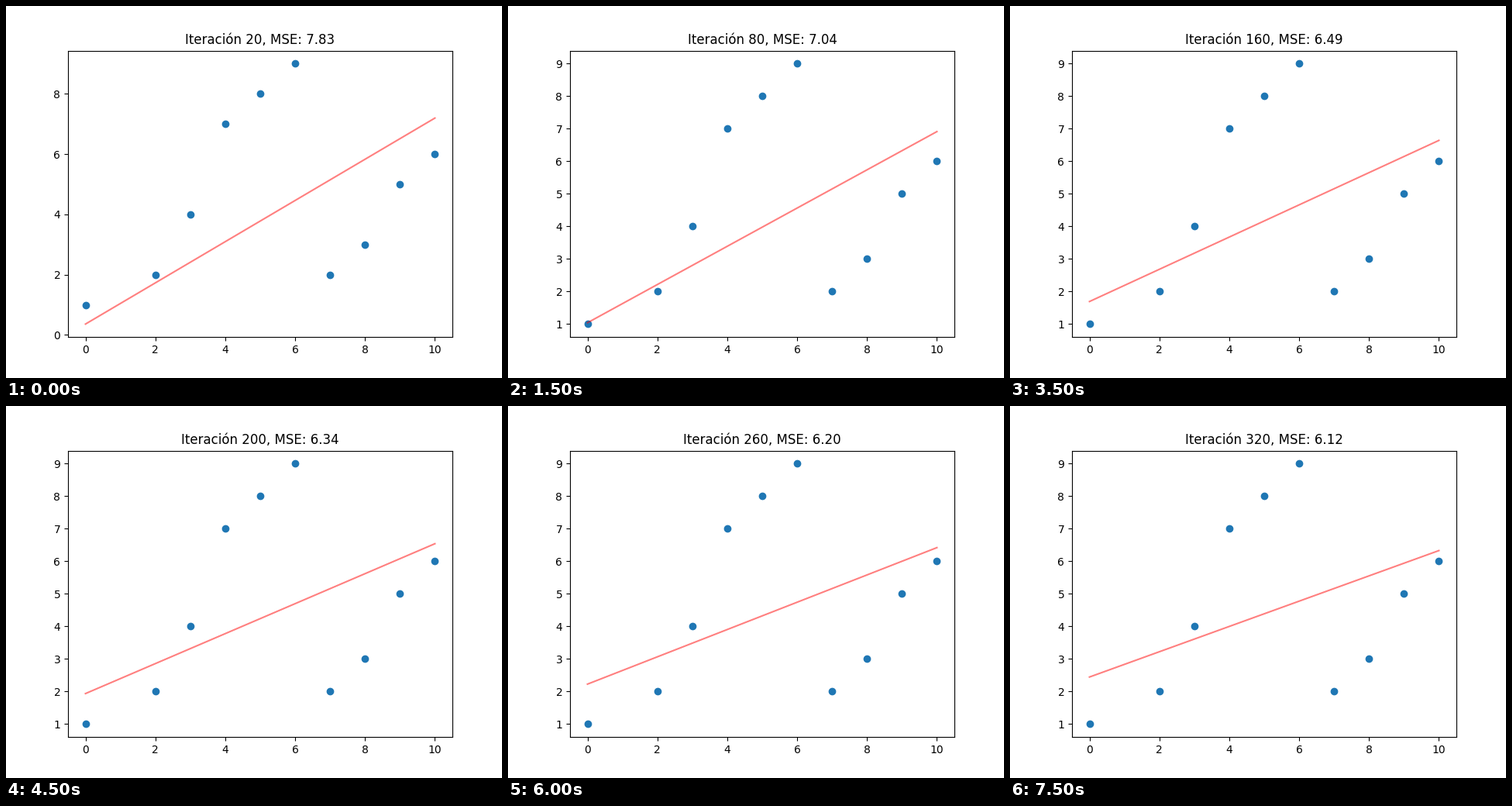
Write a matplotlib script that moves like this. It is 640 px wide and 480 px high and loops after 8 s.

```python
import numpy as np
import matplotlib.pyplot as plt
from matplotlib.animation import FuncAnimation

FRAMES = 16
STEP = 20           # iterations between frames
RATE = 0.01

x = np.array([0, 2, 3, 4, 5, 6, 7, 8, 9, 10], dtype=float)
y = np.array([1, 2, 4, 7, 8, 9, 2, 3, 5, 6], dtype=float)


def descend(count):
    """Fit y = m*x + b by gradient descent, keeping every STEP-th state."""
    m = b = 0.0
    states = []
    for i in range(1, count + 1):
        fit = m * x + b
        error = fit - y
        if i % STEP == 0:
            states.append((i, fit, np.mean(error ** 2)))
        m -= RATE * 2 * np.mean(error * x)
        b -= RATE * 2 * np.mean(error)
    return states


states = descend(FRAMES * STEP)

fig, ax = plt.subplots(figsize=(6.4, 4.8), dpi=100)


def draw(k):
    i, fit, mse = states[k]
    ax.clear()
    ax.scatter(x, y)
    ax.plot(x, fit, color="red", alpha=0.5)
    ax.set_title(f"Iteración {i}, MSE: {mse:.2f}")
    return ax.get_children()


anim = FuncAnimation(fig, draw, frames=FRAMES, interval=500,
                     repeat=True, repeat_delay=0, blit=False)
plt.show()
```
